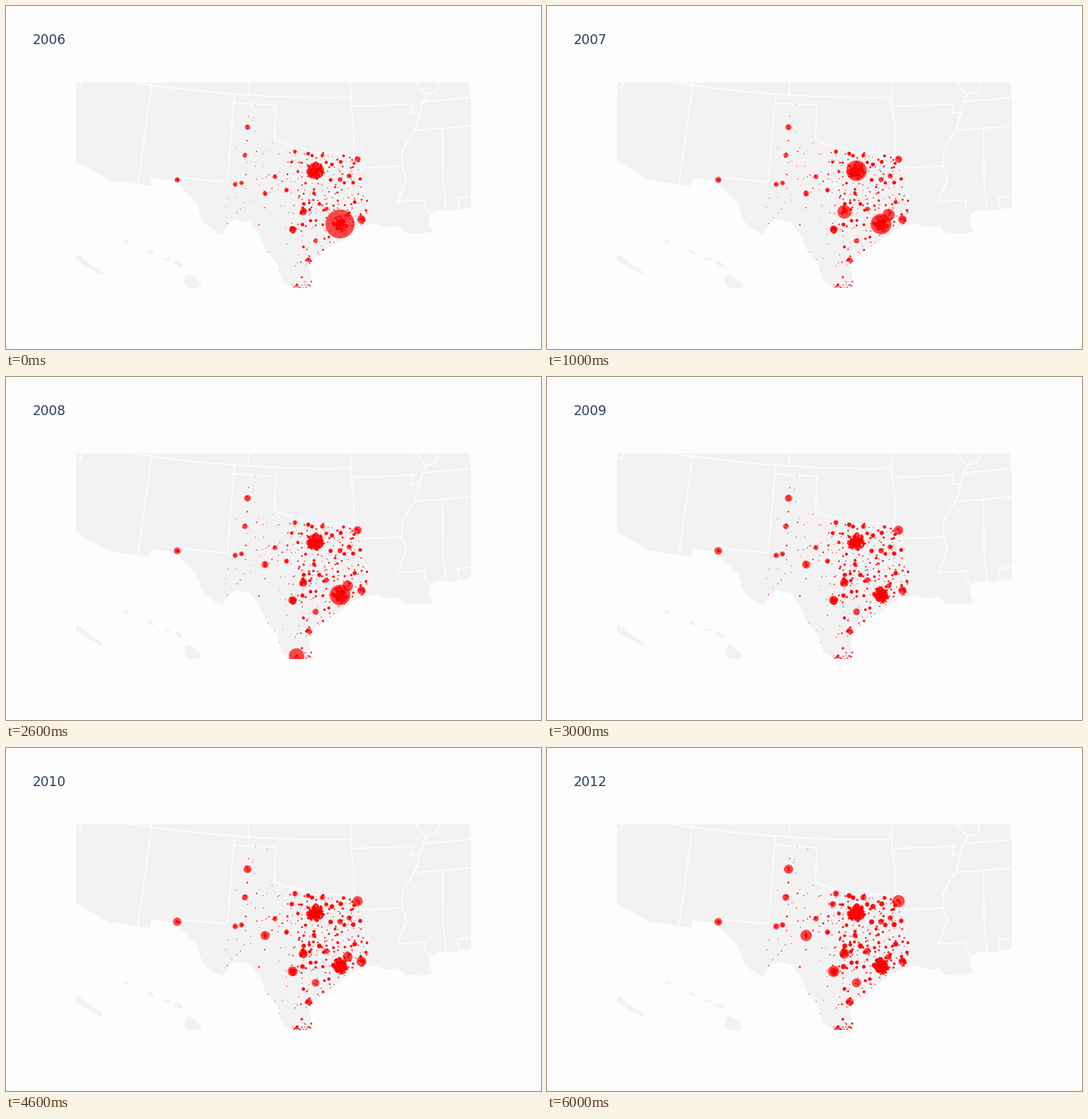
Write a matplotlib script that moves like this. It is 700 px wide and 450 px high and loops after 7000 ms.

```python
import numpy as np
import matplotlib.pyplot as plt
from matplotlib.animation import FuncAnimation
from matplotlib.patches import Ellipse, Polygon, Rectangle
from matplotlib.path import Path

W, H, DPI = 700, 450, 100
PX = 72 / DPI
YEARS = range(2006, 2013)
PAPER, LAND, INK = "#fdfdfd", "#f2f2f3", "#2a3f5f"
rng = np.random.default_rng(11)


def project(lon, lat):
    """Albers equal-area conic, standard parallels 29.5 and 45.5, in stage pixels."""
    s0, s1 = np.sin(np.radians([29.5, 45.5]))
    n = (s0 + s1) / 2
    rho = np.sqrt(1 + s0 * s1 - 2 * n * np.sin(np.radians(lat))) / n
    theta = n * np.radians(np.asarray(lon) + 96)
    return 426.1 + 1312 * rho * np.sin(theta), 1312 * rho * np.cos(theta) - 1601.2


def trace(points, steps=10):
    """Project a chain of (lon, lat) points, bending each leg with the map."""
    lon, lat = np.transpose(points)
    t = np.linspace(0, len(points) - 1, steps * (len(points) - 1) + 1)
    knots = np.arange(len(points))
    return np.column_stack(project(np.interp(t, knots, lon), np.interp(t, knots, lat)))


def parallel(lat, west, east):
    return [(west, lat), (east, lat)]


def meridian(lon, north, south):
    return [(lon, north), (lon, south)]


# Edges of the state, clockwise from its western tip
pecos = [(-106.53, 31.78), (-106.62, 32), (-103.06, 32), (-103.04, 36.5)]
panhandle = [(-103.04, 36.5), (-100, 36.5), (-100, 34.56)]
red_river = [(-100, 34.56), (-99.2, 34.3), (-98.1, 34.13), (-97.2, 33.85),
             (-95.5, 33.9), (-94.48, 33.64), (-94.04, 33.55)]
sabine = [(-94.04, 33.55), (-94.04, 32), (-93.55, 31.2), (-93.7, 30.1), (-93.85, 29.7)]
gulf = [(-93.85, 29.7), (-94.6, 29.45), (-95.6, 28.75), (-96.5, 28.35),
        (-97.1, 27.8), (-97.45, 27.3), (-97.15, 25.95)]
rio = [(-97.15, 25.95), (-98.2, 26.05), (-99.1, 26.4), (-99.5, 27.5), (-100.3, 28.28),
       (-100.7, 29.1), (-101.4, 29.77), (-102.3, 29.88), (-102.7, 29.7), (-103.15, 28.97),
       (-104.0, 29.3), (-104.5, 29.65), (-105, 30.65), (-106.2, 31.47), (-106.53, 31.78)]

west_edge = [(-106.53, 31.78), (-108.2, 31.78), (-108.2, 31.33), (-111.07, 31.33),
             (-114.8, 32.5), (-118, 34)]
east_coast = [(-86, 30.4), (-88.1, 30.3), (-88.9, 30.4), (-89.5, 30.2), (-89.6, 29.8),
              (-89.4, 29.15), (-90.2, 29.1), (-91.2, 29.2), (-91.6, 29.6), (-92.3, 29.53),
              (-93.2, 29.78), (-93.85, 29.7)]
mississippi = [(-90.2, 38.7), (-90.2, 38.2), (-89.5, 37.3), (-89.15, 37), (-89.5, 36.5),
               (-89.7, 36), (-90.1, 35.1), (-91.1, 33.9), (-91.16, 33), (-90.9, 32.3),
               (-91.6, 31), (-89.75, 31), (-89.8, 30.6), (-89.5, 30.2)]
ohio = [(-89.15, 37), (-88.45, 37.1), (-88.05, 37.8), (-87.5, 37.93), (-86, 38)]

borders = [
    pecos, panhandle, red_river, sabine, mississippi, ohio,
    parallel(37, -114.05, -94.62), parallel(36.5, -94.62, -90.15),
    parallel(33.01, -94.04, -91.16), parallel(36.6, -89.5, -85), parallel(35, -90.2, -85),
    meridian(-109.05, 38, 31.33), meridian(-103.02, 37, 36.5), meridian(-102.04, 38, 37),
    meridian(-94.62, 38.5, 36.5),
    [(-114.05, 37), (-114.05, 36.2), (-114.7, 36.1)],
    [(-94.62, 36.5), (-94.43, 35.4), (-94.48, 33.64)],
    [(-90.15, 36.5), (-90.37, 36), (-89.7, 36)],
    [(-88.2, 35), (-88.45, 31.9), (-88.4, 30.35)],
    [(-87.5, 30.3), (-87.6, 31), (-85, 31)],
]

texas = Path(trace(pecos + panhandle + red_river + sabine + gulf + rio))

# Leading cities: x, y, radius in the first and in the last year
CITIES = {
    "houston": (437, 286, 9, 9.5), "dallas": (405, 216, 6, 7),
    "austin": (389, 270, 4.5, 6.5), "san antonio": (375, 293, 4.5, 7.5),
    "el paso": (224, 228, 3.5, 6.5), "amarillo": (316, 159, 3.5, 6),
    "lubbock": (312.5, 196, 3, 4.5), "texarkana": (460, 201, 4, 8),
    "beaumont": (465, 280, 5.5, 5), "mcallen": (380, 366, 1, 1.5),
    "san angelo": (339, 246, 3, 7.5), "victoria": (405, 308, 3, 6),
    "corpus christi": (396, 333, 3, 5), "kingwood": (447, 274, 3, 4),
    "odessa": (300, 234, 3.2, 4), "midland": (308, 232, 2.8, 3.5),
    "abilene": (352, 224, 3, 3.5), "tyler": (437, 228, 3, 3.8),
    "longview": (449, 223, 3.3, 3.5), "wichita falls": (378, 191, 2.5, 4),
    "sherman": (414, 196, 2.5, 4), "bryan": (419, 266.5, 2.8, 4.5),
    "waco": (403, 246, 2.5, 3.5), "brownwood": (367, 241.5, 3, 3.5),
    "vernon": (374, 205, 1, 4),
}
SURGES = {
    2006: {"houston": 19, "dallas": 11},
    2007: {"houston": 13.5, "dallas": 13.5, "austin": 9, "kingwood": 8},
    2008: {"houston": 13.5, "dallas": 10.5, "mcallen": 10, "kingwood": 7},
    2010: {"beaumont": 6.5, "kingwood": 6.5},
    2011: {"austin": 10.5},
    2012: {"el paso": 5},
}
# Suburbs: how many and how far out
METROS = {"houston": (60, 11), "dallas": (70, 12), "austin": (14, 5),
          "san antonio": (18, 5), "corpus christi": (8, 5), "beaumont": (8, 4)}


def suburbs(name):
    """Places packed around a city, smaller towards the edge."""
    x, y, _, _ = CITIES[name]
    count, spread = METROS.get(name, (3, 2.5))
    reach = rng.uniform(0, 1, count) ** 0.7
    angle = rng.uniform(0, 2 * np.pi, count)
    size = (1.1 + 0.2 * spread * (1 - reach)) * rng.uniform(0.7, 1.2, count)
    return np.column_stack([x + spread * reach * np.cos(angle),
                            y + spread * reach * np.sin(angle), size])


def countryside(step=6.8):
    """Small towns on a jittered grid, denser and larger in the north-east."""
    x, y = np.meshgrid(np.arange(279, 472, step), np.arange(131, 372, step))
    spots = np.column_stack([x.ravel(), y.ravel()])
    spots += rng.uniform(-0.45, 0.45, spots.shape) * step
    x, y = spots.T
    east = 1 / (1 + np.exp((372 - x) / 9))
    north = 1 / (1 + np.exp((y - 300) / 9))
    busy = east * (0.25 + 0.75 * north)
    keep = texas.contains_points(spots) & (rng.uniform(0, 1, len(x)) < 0.2 + 0.75 * busy)
    size = 0.45 + rng.exponential(0.15 + 0.65 * busy)
    return np.column_stack([spots, np.minimum(size, 2.8)])[keep]


def valley(count=14):
    """Row of tiny towns along the southern tip."""
    return np.column_stack([np.linspace(375, 398, count), rng.uniform(365, 370, count),
                            rng.uniform(0.5, 1.1, count)])


cities = np.array(list(CITIES.values()))
towns = np.vstack([suburbs(name) for name in CITIES] + [countryside(), valley()])
spots = np.vstack([cities[:, :2], towns[:, :2]])
# Towns stand for several stacked places, so they read as solid
tints = np.array([(1, 0, 0, 0.7)] * len(cities) + [(1, 0, 0, 0.95)] * len(towns))


def bubble_areas(i):
    t = i / (len(YEARS) - 1)
    hubs = cities[:, 2] + (cities[:, 3] - cities[:, 2]) * t
    for name, radius in SURGES.get(YEARS[i], {}).items():
        hubs[list(CITIES).index(name)] = radius
    radii = np.concatenate([hubs, towns[:, 2] * (0.85 + 0.35 * t)])
    return (2 * radii * PX) ** 2


fig = plt.figure(figsize=(W / DPI, H / DPI), dpi=DPI, facecolor=PAPER)
ax = fig.add_axes([0, 0, 1, 1])
ax.set(xlim=(0, W), ylim=(H, 0))
ax.axis("off")

frame = Rectangle((92, 100), 516, 270, fc="none", ec="none")
ax.add_patch(frame)


def add_land(patch):
    patch.set(facecolor=LAND, edgecolor="none")
    ax.add_patch(patch)
    patch.set_clip_path(frame)


add_land(Polygon(trace([(-118, 40), (-86, 40)] + east_coast + gulf + rio + west_edge)))
add_land(Polygon([(92, 326), (98, 328), (114, 342), (122, 345), (128, 353), (120, 350), (92, 334)]))
add_land(Polygon([(236, 352), (243, 353), (257, 366), (250, 371), (238, 371), (233, 363)]))
for x, y, w, h, tilt in [(157, 309, 6, 4, 0), (190, 323, 10, 4, 30),
                         (211, 332, 10, 2.5, 5), (226, 338.5, 12, 5, 25)]:
    add_land(Ellipse((x, y), w, h, angle=tilt))

for border in borders:
    line, = ax.plot(*trace(border).T, color="white", lw=1.4 * PX, solid_joinstyle="round")
    line.set_clip_path(frame)

bubbles = ax.scatter(*spots.T, s=bubble_areas(0), c=tints, linewidths=0, zorder=3)
bubbles.set_clip_path(frame)
label = ax.text(35, 50, "2006", family="DejaVu Sans", size=17.3 * PX, color=INK)


def draw(i):
    bubbles.set_sizes(bubble_areas(i))
    label.set_text(str(YEARS[i]))
    return bubbles, label


anim = FuncAnimation(fig, draw, frames=len(YEARS), interval=1000, repeat=True, repeat_delay=0)
plt.show()
```
